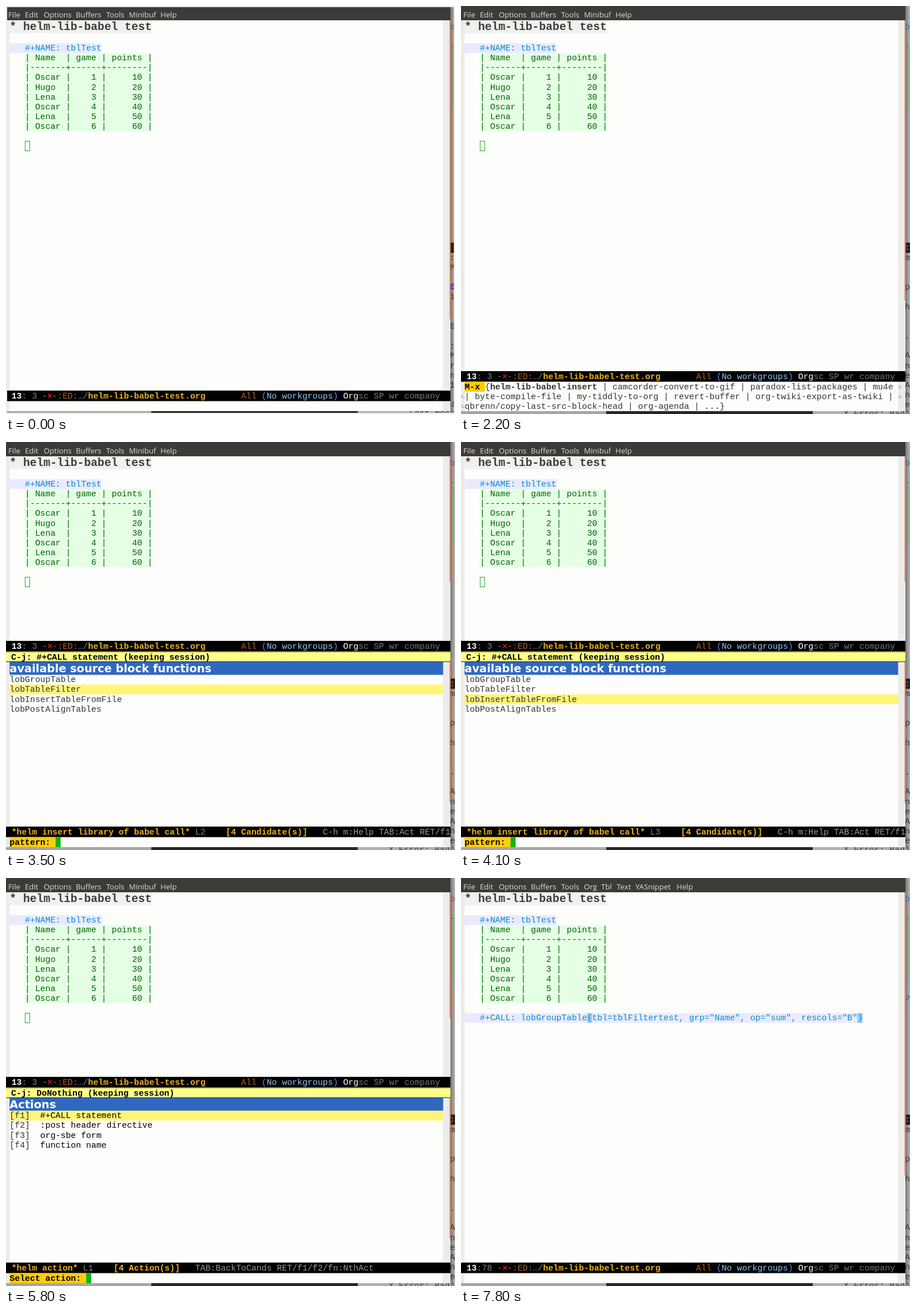
Write an HTML page with a canvas that moves like this. It is 785 by 714 pixels and loops after 8000 ms.

```html
<!DOCTYPE html>
<html>
<head>
<meta charset="utf-8">
<style>
html, body { margin: 0; width: 100%; height: 100%; overflow: hidden; background: #fdfdfc; }
canvas { display: block; }
</style>
</head>
<body>
<canvas id="stage" width="785" height="714"></canvas>
<script>
const ctx = document.getElementById('stage').getContext('2d');
const MONO = '"Liberation Mono", monospace', SANS = '"DejaVu Sans", sans-serif', MENU = '"Open Sans", sans-serif';
const CW = 8.92, ROW = 17.14, X0 = 6.3;
const BG = '#fdfdfc', INK = '#333', GRAY = '#7f7f7f', GOLD = '#ebb01f', RUST = '#b5601c',
  BLUE = '#008ed1', GREEN = '#006600', CURSOR = '#0fb50f', ORANGE = '#f08058';

const menus = {
  mini: [['Minibuf', 215], ['Help', 270]],
  org: [['Org', 215], ['Tbl', 245], ['Text', 272], ['YASnippet', 305], ['Help', 377]]
};
const table = [
  '| Name  | game | points |',
  '|-------+------+--------|',
  ...['Oscar', 'Hugo', 'Lena', 'Oscar', 'Lena', 'Oscar'].map((name, i) =>
    `| ${name.padEnd(5)} |    ${i + 1} |     ${i + 1}0 |`)
];
const commands = ['camcorder-record', 'helm-lib-babel-insert', 'camcorder-convert-to-gif',
  'paradox-list-packages', 'mu4e', 'byte-compile-file', 'my-tiddly-to-org', 'revert-buffer',
  'org-twiki-export-as-twiki', 'qbrenn/copy-last-src-block-head', 'org-agenda'];
const functions = ['lobGroupTable', 'lobTableFilter', 'lobInsertTableFromFile', 'lobPostAlignTables'];
const actions = ['#+CALL statement', ':post header directive', 'org-sbe form', 'function name'];
const call = '#+CALL: lobGroupTable(tbl=tblFiltertest, grp="Name", op="sum", rescols="B")';

function box(x, y, w, h, color) {
  ctx.fillStyle = color;
  ctx.fillRect(x, y, w, h);
}

function text(s, x, y, color = INK, bold = false, size = 15, family = MONO) {
  ctx.save();
  ctx.translate(x, y);
  ctx.scale(.991, 1.008);
  ctx.font = `${bold ? 'bold ' : ''}${size}px ${family}`;
  ctx.fillStyle = color;
  ctx.fillText(s, 0, 0);
  ctx.restore();
}

// Each run is [text, colour, bold]; cells advance by a fixed width.
function runs(x, y, list) {
  for (const [s, color, bold] of list) {
    text(s, x, y, color, bold);
    x += s.length * CW;
  }
}

function desktop(first) {
  box(0, 0, 785, 714, '#d8d8d8');
  box(778, 78, 7, 104, '#c4dccc');
  box(0, 709, 254, 5, '#a6a6a6');
  box(254, 709, 361, 5, '#262626');
  box(615, 709, 170, 5, '#b0b0b0');
  const shade = ctx.createLinearGradient(777, 0, 786, 0);
  shade.addColorStop(0, 'rgba(0,0,0,.45)');
  shade.addColorStop(1, 'rgba(0,0,0,.12)');
  box(777, 0, 8, 709, shade);
  box(777, 414, 8, 18, '#222');
  const marks = first
    ? [':440', 'M457', '0491', 'i508', '0560', ':595', 'M611', 'r629', 'n646', '1663', '4697']
    : ['m440', 'p491', 'h526', '.577', 'A611', 'n629', 'e646', 'A663', 'n680', 'e697'];
  for (const m of marks)
    text(m[0], 776, +m.slice(1) + 4.5, m === '0491' ? '#00c' : m === '4697' ? '#a0209a' : INK);
  text('b', 776, 41, '#1a6fb0');
  text('-', 776, 75, '#1c8a2a');
  if (first) text('Last mess', 705, 717, INK);
  else {
    text(':', 776, 427, '#c07020');
    text('X Error: BadA', 669, 718, '#444');
  }
}

function menuBar(kind) {
  box(0, 0, 777, 25, '#3c3b37');
  const items = [['File', 4], ['Edit', 33], ['Options', 66], ['Buffers', 122], ['Tools', 175], ...menus[kind]];
  for (const [s, x] of items) text(s, x, 20, '#dfdbd2', false, 13.3, MENU);
}

function modeLine(y, list) {
  box(0, y, 777, 18.5, '#000');
  ctx.save();
  ctx.beginPath();
  ctx.rect(0, y, 777, 19);
  ctx.clip();
  runs(9.7, y + 14, list);
  ctx.restore();
}

function orgModeLine(y, col) {
  modeLine(y, [['13', '#fff', true], [':' + String(col).padStart(2) + ' -', GRAY], ['×', '#e81010', true],
    ['-', GRAY], [':ED:', RUST], ['…/', GRAY], ['helm-lib-babel-test.org', GOLD, true],
    ['       All ', RUST], ['(', '#7b7be8'], ['No workgroups', '#8cc8f8'], [') ', '#7b7be8'],
    ['Org', '#fff'], ['sc SP wr company', '#777']]);
}

function scrollbar(y, end) {
  box(775.5, y, 2, end - y, ORANGE);
}

function orgBuffer() {
  box(X0, 25, 248.7, 22.5, '#f0f0ee');
  text('* helm-lib-babel test', X0, 42, '#3c3c3c', true, 19.9);
  box(X0, 65, 160.5, ROW, '#eaeaff');
  text('#+NAME: tblTest', X0 + 3 * CW, 78, BLUE);
  box(33, 82.1, 222.5, 8 * ROW, '#e5ffe5');
  table.forEach((row, i) => text(row, X0 + 3 * CW, 78 + (i + 1) * ROW, GREEN));
}

function callLine() {
  const x = X0 + 3 * CW;
  box(X0, 236.4, 78 * CW, ROW, '#eaeaff');
  box(x + 21 * CW, 236.4, CW, ROW, '#94ccff');
  box(x + 74 * CW, 236.4, CW, ROW, '#94ccff');
  text(call, x, 249.4, BLUE);
}

function hollowCursor() {
  ctx.strokeStyle = '#2aa52a';
  ctx.lineWidth = 1;
  ctx.strokeRect(33.5, 236.5, 8, 17);
}

function prompt(label, y, cursor) {
  const w = label.length * CW;
  box(X0, y, w, 17.5, '#ffcc0a');
  text(label, X0, y + 13.5, '#000', true);
  if (cursor) box(X0 + w, y, CW, 17.5, CURSOR);
}

function wrapMark(x, y, dir) {
  ctx.strokeStyle = '#888';
  ctx.lineWidth = 1;
  ctx.beginPath();
  ctx.arc(x, y, 2.2, -Math.PI / 2, Math.PI / 2, dir < 0);
  ctx.lineTo(x - dir * 2.5, y + 2.2);
  ctx.stroke();
}

function commandPrompt(first, cursor) {
  const names = commands.slice(first, first + 10);
  const all = 'M-x {' + names.join(' | ') + ' | ...}';
  prompt('M-x ', 657.5, cursor);
  text('{', X0 + 4 * CW, 671, cursor ? '#fff' : INK);
  text(names[0], X0 + 5 * CW, 671, INK, true);
  const start = 5 + names[0].length;
  text(all.slice(start, 85), X0 + start * CW, 671);
  for (let i = 1; i < 3; i++) {
    text(all.slice(85 * i, 85 * i + 85), X0, 671 + i * ROW);
    wrapMark(767, 649 + i * ROW, 1);
    wrapMark(3.5, 666 + i * ROW, -1);
  }
}

function helm(header, title, rows, selected, status) {
  box(0, 366.5, 777, 18.5, '#ffff88');
  box(0, 366.5, 777, 1, '#222');
  box(0, 384, 777, 1, '#222');
  text(header, 9, 381, '#000', true);
  box(X0, 385, 758, 22.5, '#2f69bf');
  text(title, X0, 403, '#fff', true, 19.6, SANS);
  box(X0, 407.3 + selected * ROW, 758, ROW, '#fff576');
  rows.forEach((row, i) => runs(X0, 420.3 + i * ROW, row));
  modeLine(673, status);
}

function draw(t) {
  const first = t < 100, mx = t >= 900 && t < 2600, session = t >= 2600 && t < 7200, done = t >= 7200;
  const within = (a, b) => t >= a && t < b;
  desktop(first);
  box(0, 25, 777, 684, BG);
  box(0, 25, X0, 684, '#ebebea');
  box(764, 25, 13, 684, '#ebebea');
  menuBar(first || mx || session ? 'mini' : 'org');
  orgBuffer();
  if (first || mx || session) hollowCursor();
  else if (within(100, 600)) box(33, 236.4, CW, ROW, CURSOR);

  if (done) {
    callLine();
    if (t < 7700) box(X0 + 78 * CW, 236.4, CW, ROW, CURSOR);
    text('o', 776, 212.5, '#1a6fb0');
  }

  if (mx) {
    orgModeLine(639, 3);
    scrollbar(25, 516);
    commandPrompt(t < 1700 ? 0 : 1, !within(1400, 1700) && t < 2200);
  } else if (session) {
    orgModeLine(348, 3);
    scrollbar(25, 245);
    if (t < 5700) {
      const sel = within(3900, 4400) ? 2 : within(3500, 4800) ? 1 : 0;
      helm('C-j: #+CALL statement (keeping session)', 'available source block functions',
        functions.map(s => [[s, INK]]), sel,
        [['*helm insert library of babel call*', GOLD, true], [` L${sel + 1}    `, GRAY],
          ['[4 Candidate(s)]', GOLD, true], ['   C-h m:Help TAB:Act RET/f1', '#999']]);
      prompt('pattern: ', 691.5, !within(3200, 3500) && t < 5400);
    } else {
      helm('C-j: DoNothing (keeping session)', 'Actions',
        actions.map((s, i) => [[`[f${i + 1}]  `, INK], [s, '#000']]), 0,
        [['*helm action*', GOLD, true], [' L1    ', GRAY], ['[4 Action(s)]', GOLD, true],
          ['   TAB:BackToCands RET/f1/f2/fn:NthAct', '#999']]);
      prompt('Select action: ', 691.5, !within(6200, 6600));
    }
    scrollbar(385, 630);
  } else {
    orgModeLine(673, done ? 78 : 3);
    scrollbar(25, first ? 548 : 520);
  }

  if (first) {
    box(0, 0, 785, 2, '#ececec');
    box(0, 0, 2, 714, '#ececec');
    box(783, 0, 2, 714, '#ececec');
    box(0, 712, 785, 2, '#ececec');
  }
}

function tick(now) {
  draw(now % 8000);
  requestAnimationFrame(tick);
}
requestAnimationFrame(tick);
</script>
</body>
</html>
```
